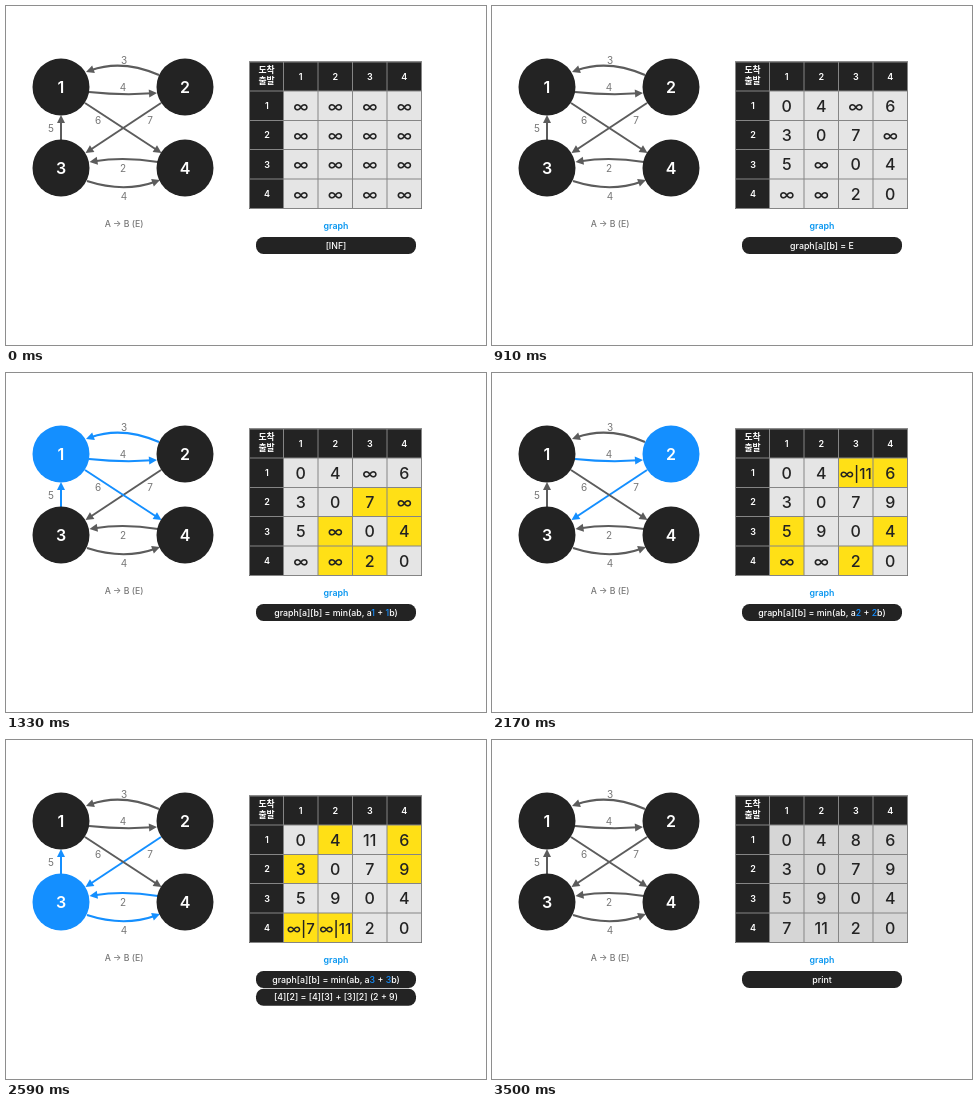
Recreate the animation shown at these times as an HTML page. Size 480 by 339 pixels, loop 3920 ms.

```html
<!DOCTYPE html>
<html lang="ko">
<head>
<meta charset="utf-8">
<title>Shortest paths between all nodes</title>
<style>
html, body { margin: 0; width: 100%; height: 100%; overflow: hidden; background: #fff; }
svg { display: block; width: 480px; height: 339px; }
text { font-family: Inter, "Noto Sans CJK KR", "Noto Sans CJK", sans-serif; text-anchor: middle; white-space: pre; }
</style>
</head>
<body>
<svg id="stage" viewBox="0 0 480 339"></svg>
<script>
const DARK = '#232323', GREY = '#5c5c5c', LABEL = '#777', BLUE = '#148fff', YELLOW = '#ffe016';
const LOOP = 3920, CUTS = [490, 910, 1330, 1750, 2170, 2590, 3010, 3500];
const PIVOT = [0, 0, 0, 1, 1, 2, 3, 4, 0]; // node being passed through at each step
const INF = Infinity, IDS = [1, 2, 3, 4];
const COLS = [243.5, 277.5, 312, 346.5, 381, 415.5];
const ROWS = [56, 85, 114.5, 143.5, 173, 202.5];
const NODES = [[55, 81], [179, 81], [55, 162], [179, 162]];

// from, to, weight, pivots that light it, start, control, end, label
const EDGES = [
  [2, 1, 3, [1], [153, 69], [116, 53], [80, 66], [118, 54]],
  [1, 2, 4, [1, 2], [83, 86], [116, 89.5], [151, 87], [117, 81]],
  [2, 3, 7, [2, 3], [155, 97], [117, 122], [79.5, 147], [144, 114]],
  [1, 4, 6, [1, 4], [79, 97], [117, 122], [155.5, 147], [92, 114]],
  [3, 1, 5, [1, 3], [55, 134], [55, 122], [55, 109], [45, 122]],
  [4, 3, 2, [3, 4], [152, 156], [118, 150.5], [83.5, 156], [117, 162]],
  [3, 4, 4, [3, 4], [81, 175], [118, 187], [154, 174], [118, 190]]
];

const text = (x, y, size, fill, str, weight = 500) =>
  `<text x="${x}" y="${y + size * 0.364}" font-size="${size}" font-weight="${weight}" fill="${fill}">${str}</text>`;
const rect = (x, y, w, h, fill, r = 0) =>
  `<rect x="${x}" y="${y}" width="${w}" height="${h}" rx="${r}" fill="${fill}"/>`;
const show = v => v === INF ? '∞' : v;
const mid = (list, i) => (list[i] + list[i + 1]) / 2;

function drawEdge([, , weight, lit, a, c, b, label], pivot) {
  const color = lit.includes(pivot) ? BLUE : GREY;
  const angle = Math.atan2(b[1] - c[1], b[0] - c[0]);
  const neck = [b[0] - 5 * Math.cos(angle), b[1] - 5 * Math.sin(angle)];
  return `<path d="M${a}Q${c} ${neck}" fill="none" stroke="${color}" stroke-width="2"/>` +
    `<path d="M0 0L-8 -4V4Z" fill="${color}" transform="translate(${b}) rotate(${angle * 180 / Math.PI})"/>` +
    text(...label, 10, LABEL, weight, 400);
}

// cell labels for a step, built by relaxing through the pivots so far
function cellsAt(step) {
  const d = IDS.map(a => IDS.map(b => step > 0 && a === b ? 0 : INF));
  if (step > 1) for (const [a, b, w] of EDGES) d[a - 1][b - 1] = w;
  const current = PIVOT[step];
  const last = step === 3 ? 0 : step === 8 ? 4 : current;
  let cells = d.map(row => row.map(show));
  for (let k = 1; k <= last; k++) {
    cells = d.map((row, a) => row.map((old, b) => {
      const next = Math.min(old, d[a][k - 1] + d[k - 1][b]);
      row[b] = next;
      return next < old && k === current ? `${show(old)}|${next}` : show(next);
    }));
  }
  return cells;
}

function drawTable(step) {
  const k = PIVOT[step], plain = step > 6 ? '#d6d6d6' : '#e5e5e5';
  let out = rect(243, 55.5, 173, 147.5, DARK);
  out += text(260.5, 64, 8.8, '#fff', '도착', 700) + text(260.5, 75, 8.8, '#fff', '출발', 700);
  for (const i of IDS) {
    out += text(mid(COLS, i), 71, 9, '#fff', i, 600) + text(261, mid(ROWS, i), 9, '#fff', i, 600);
  }
  let labels = '';
  cellsAt(step).forEach((row, r) => row.forEach((value, c) => {
    const a = r + 1, b = c + 1, hot = k && a !== b && a !== k && b !== k;
    out += rect(COLS[b], ROWS[a], COLS[b + 1] - COLS[b], ROWS[a + 1] - ROWS[a], hot ? YELLOW : plain);
    labels += text(mid(COLS, b), mid(ROWS, a) + 0.3, String(value).includes('|') ? 15 : 16, DARK, value);
  }));
  const grid = COLS.map(x => `M${x} 56V202.5`).join('') + ROWS.map(y => `M243.5 ${y}H415.5`).join('');
  return out + `<path d="${grid}" stroke="#858585" fill="none"/>` + labels;
}

function caption(step) {
  const k = PIVOT[step], mark = `<tspan fill="${BLUE}">${k}</tspan>`;
  if (k) return `graph[a][b] = min(ab, a${mark} + ${mark}b)`;
  return ['[INF]', 'graph[a][a] = 0', 'graph[a][b] = E'][step] || 'print';
}

const bar = (y, str) => rect(250, y, 160, 17, DARK, 7.5) + text(330, y + 8.5, 8.8, '#fff', str);

function draw(step) {
  const k = PIVOT[step];
  return EDGES.map(e => drawEdge(e, k)).join('') +
    NODES.map(([x, y], i) =>
      `<circle cx="${x}" cy="${y}" r="28.5" fill="${i + 1 === k ? BLUE : DARK}"/>` +
      text(x, y + 0.3, 16, '#fff', i + 1, 600)).join('') +
    text(118, 218, 8.7, LABEL, 'A → B (E)') +
    drawTable(step) +
    text(330, 220, 8.8, '#0896f0', 'graph', 600) +
    bar(231, caption(step)) +
    (k === 3 ? bar(248.7, '[4][2] = [4][3] + [3][2] (2 + 9)') : '');
}

const stage = document.getElementById('stage');
const start = performance.now();
let shown = -1;
function tick() {
  const t = (performance.now() - start) % LOOP;
  const step = CUTS.filter(cut => cut <= t).length;
  if (step !== shown) stage.innerHTML = draw(shown = step);
  requestAnimationFrame(tick);
}
tick();
</script>
</body>
</html>
```
